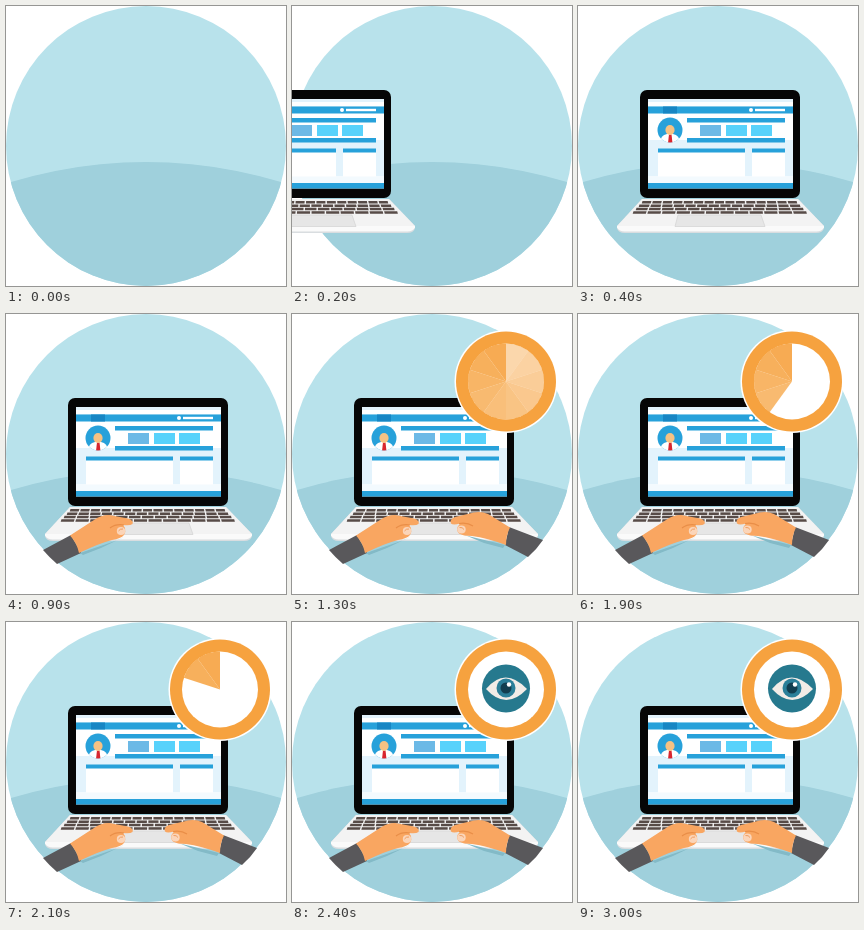
Animation, 280 px wide and 280 px high, one loop 4000 ms. Source, as an HTML page:

```html
<!DOCTYPE html>
<html lang="en">
<head>
<meta charset="utf-8">
<title>Laptop and eye</title>
<style>
  html, body { margin: 0; width: 100%; height: 100%; overflow: hidden; background: #fff; }
  svg { display: block; width: 100vw; height: 100vh; }
</style>
</head>
<body>
<svg viewBox="0 0 280 280">
  <defs>
    <clipPath id="disc"><circle cx="140" cy="140" r="140"/></clipPath>
    <clipPath id="face"><circle cx="92" cy="124" r="12.5"/></clipPath>
    <clipPath id="lids"><path d="M194 67Q213 44 235 67Q214 89 194 67Z"/></clipPath>
  </defs>

  <circle cx="140" cy="140" r="140" fill="#b8e2eb"/>
  <circle cx="140" cy="621" r="465" fill="#9fd0dc" clip-path="url(#disc)"/>

  <g id="laptop">
    <rect x="62" y="84" width="160" height="108" rx="7" fill="#060606"/>
    <rect x="70" y="93" width="145" height="89.5" fill="#e3f3fc"/>
    <rect x="70" y="96" width="145" height="4" fill="#fff"/>
    <rect x="70" y="107" width="145" height="27" fill="#fff"/>
    <rect x="70" y="170" width="145" height="7" fill="#f3fafe"/>
    <g fill="#27a1da">
      <rect x="70" y="100.5" width="145" height="7"/>
      <rect x="109" y="112" width="98" height="4.5"/>
      <rect x="109" y="132" width="98" height="4.5"/>
      <rect x="70" y="177" width="145" height="5.5"/>
    </g>
    <rect x="85" y="100.5" width="14" height="7" fill="#1786c4"/>
    <circle cx="173" cy="104" r="2" fill="#fff"/>
    <rect x="177" y="102.8" width="30" height="2.4" fill="#fff"/>
    <rect x="122" y="119" width="21" height="11" fill="#6cb9e6"/>
    <rect x="148" y="119" width="21" height="11" fill="#58d2fb"/>
    <rect x="173" y="119" width="21" height="11" fill="#58d2fb"/>
    <g fill="#fff">
      <rect x="80" y="143" width="87" height="27.5"/>
      <rect x="174" y="143" width="33" height="27.5"/>
    </g>
    <g fill="#27a1da">
      <rect x="80" y="142.5" width="87" height="4"/>
      <rect x="174" y="142.5" width="33" height="4"/>
    </g>
    <circle cx="92" cy="124" r="12.5" fill="#27a1da"/>
    <g clip-path="url(#face)">
      <path d="M82 138Q82 129 89 128H95Q102 129 102 138Z" fill="#fff"/>
      <path d="M91 128.5H93.5L94.5 137H90Z" fill="#d8262f"/>
      <ellipse cx="92" cy="124" rx="4.6" ry="5" fill="#f6c283"/>
    </g>

    <path d="M64 193H220L246 220V222Q245 227 238 227H47Q40 227 39 222V220Z" fill="#d9dde0"/>
    <path d="M64 193H220L246 220H39Z" fill="#f3f3f3"/>
    <path d="M39 220H246V221.5Q244 225.5 238 225.5H47Q41 225.5 39 221.5Z" fill="#fafafa"/>
    <path d="M100 209H183L187 220.5H97Z" fill="#e6e6e6" stroke="#d3d3d3" stroke-width=".7"/>
    <g id="keys" fill="#574b47"></g>
  </g>

  <g id="left">
    <path d="M74 239L112 226L118 223L95 234L77 241Z" fill="#83bac7"/>
    <path d="M37 236L65 221L75 239L51 250Q43 243 37 236Z" fill="#59585b"/>
    <path d="M64 221.500L88 206Q95 201 103 201L122 204.500Q128 206.500 126.500 210Q124 212 117 211L119 214Q120 218 118 221Q115 224.500 106 226Q94 229 73 239Q71 229 64 221.500Z" fill="#f9a661"/>
    <path d="M104 214Q110 209.500 118 211" fill="none" stroke="#e98e48" stroke-width="1.200"/>
    <ellipse cx="115" cy="217" rx="4.200" ry="4" fill="#fbd5b9"/>
    <path d="M112.500 217Q114 214.500 117 215" fill="none" stroke="#ef9d61"/>
  </g>

  <g id="right">
    <path d="M213 231L176 222L168 219L192 229L211 234Z" fill="#83bac7"/>
    <path d="M217 213L251 226Q245 235 236 243L213 231Z" fill="#59585b"/>
    <path d="M218 213.500L196 200Q189 197 182 198.500L163 203Q157 205.500 159 209.500Q161 211.500 168 209.500L165.500 213Q164.500 217 167 219.500Q171 222 180 222Q195 224 214 231Q214 221 218 213.500Z" fill="#f9a661"/>
    <path d="M181 212Q175 208 167 209.500" fill="none" stroke="#e98e48" stroke-width="1.200"/>
    <ellipse cx="169.500" cy="215.500" rx="4.200" ry="4" fill="#fbd5b9"/>
    <path d="M172 215.500Q170.500 213 167.500 213.500" fill="none" stroke="#ef9d61"/>
  </g>

  <g id="badge">
    <circle cx="214" cy="67.500" r="51.500" fill="#fff"/>
    <circle cx="214" cy="67.500" r="50" fill="#f6a23f"/>
    <circle cx="214" cy="67.500" r="38" fill="#fff"/>
    <g id="pie" fill="#f6a23f"></g>
    <g id="eye">
      <circle cx="214" cy="66.500" r="24" fill="#26798e"/>
      <g id="ball">
        <path d="M194 67Q213 44 235 67Q214 89 194 67Z" fill="#f1ece7"/>
        <g clip-path="url(#lids)">
          <circle cx="214" cy="66" r="9.500" fill="#2b7f99"/>
          <circle cx="214" cy="66" r="5.500" fill="#123e50"/>
          <circle cx="217" cy="62.500" r="2.200" fill="#fff"/>
        </g>
      </g>
    </g>
  </g>
</svg>
<script>
const STEP = 100, LOOP = 4000, WEDGES = 10;
const cx = 214, cy = 67.5, radius = 38;
const el = id => document.getElementById(id);
const laptop = el('laptop'), left = el('left'), right = el('right');
const badge = el('badge'), pie = el('pie'), eye = el('eye'), ball = el('ball');

function addPath(parent, d, opacity = 1) {
  const p = document.createElementNS('http://www.w3.org/2000/svg', 'path');
  p.setAttribute('d', d);
  p.setAttribute('fill-opacity', opacity);
  parent.append(p);
  return p;
}

// Keyboard rows widen towards the viewer.
for (let row = 0; row < 4; row++) {
  const y = 195 + row * 3.4, x0 = 64.5 - row * 3, x1 = 220 + row * 3.2;
  const count = 15 - row, w = (x1 - x0) / count;
  for (let i = 0; i < count; i++) {
    const x = x0 + i * w, lean = 1.6 * (i / count - 0.5);
    addPath(el('keys'), `M${x} ${y}h${w - 1.4}l${lean} 2.5h${1.4 - w}Z`);
  }
}

const rim = i => {
  const a = i * 2 * Math.PI / WEDGES;
  return `${cx + radius * Math.sin(a)} ${cy - radius * Math.cos(a)}`;
};
const wedges = Array.from({ length: WEDGES }, (_, i) =>
  addPath(pie, `M${cx} ${cy}L${rim(i)}A${radius} ${radius} 0 0 1 ${rim(i + 1)}Z`, 0.43 + i * 0.052));

const show = (node, on) => node.setAttribute('display', on ? 'inline' : 'none');
const move = (node, x, y) => node.setAttribute('transform', `translate(${x} ${y})`);
const scale = (node, x, y, sx, sy) =>
  node.setAttribute('transform', `translate(${x} ${y}) scale(${sx} ${sy}) translate(${-x} ${-y})`);

function draw(time) {
  const k = Math.floor(time % LOOP / STEP);

  show(laptop, k >= 1);
  move(laptop, -61.5 * Math.max(0, 4 - k), 0);

  // Hands take turns pulling back while the pie counts down.
  const typing = k >= 10 && k < 24;
  const leftBack = typing && k % 4 === 2, rightBack = typing && k % 4 === 0;
  show(left, k >= 9);
  show(right, k >= 10);
  move(left, leftBack ? -22 : 0, leftBack ? 25 : 0);
  move(right, rightBack ? 21 : 0, rightBack ? 25 : 0);

  const size = Math.min(1, Math.max(0, (k - 10) / 3));
  show(badge, k >= 11);
  scale(badge, cx, cy, size, size);
  wedges.forEach((w, i) => show(w, k - 13 <= i));

  show(eye, k >= 24);
  scale(ball, 214, 67, 1, k === 29 ? 0.1 : 1);
}

function tick(now) {
  draw(now);
  requestAnimationFrame(tick);
}
draw(0);
requestAnimationFrame(tick);
</script>
</body>
</html>
```
